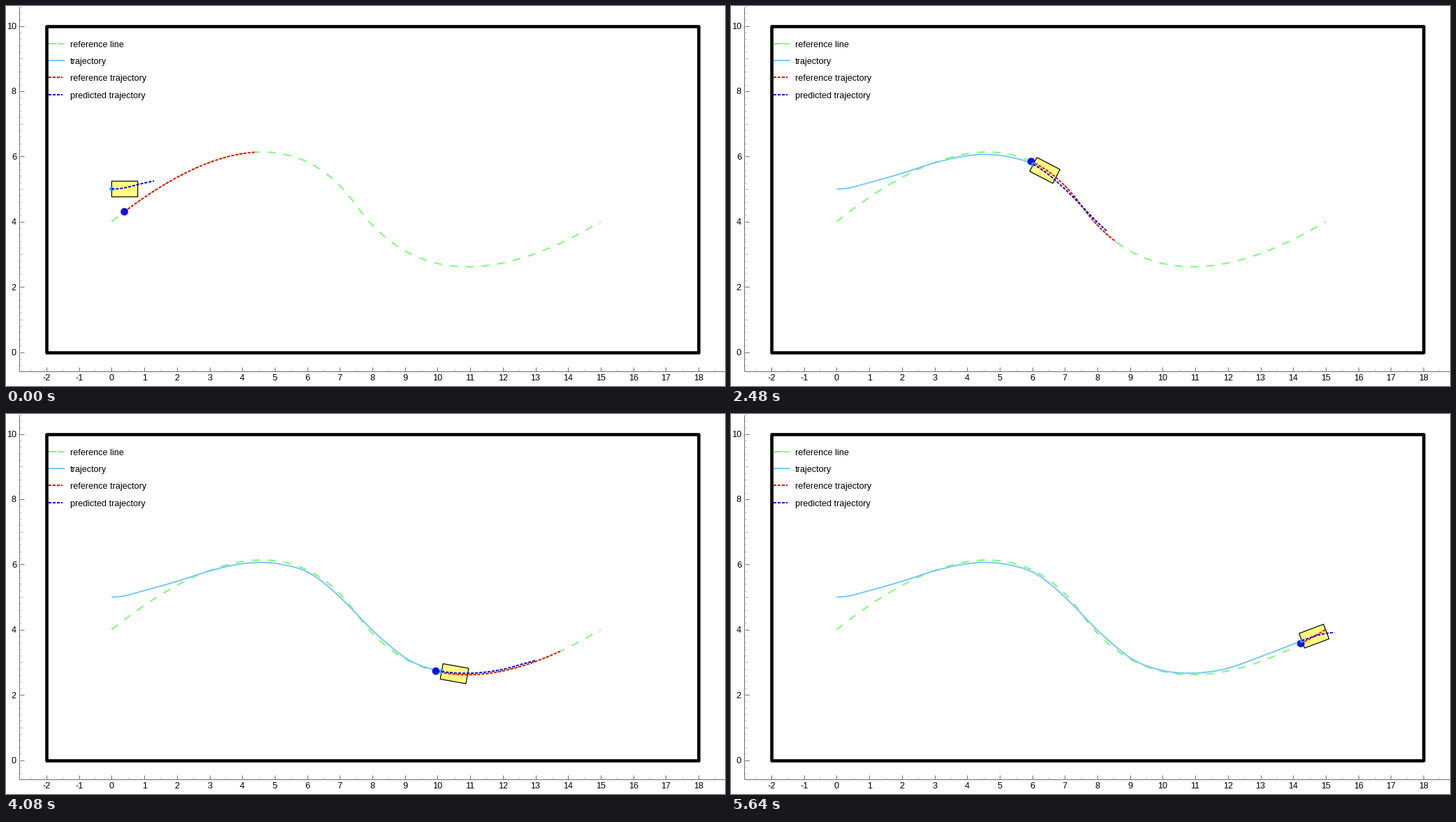
Animation, 1030 px wide and 544 px high, one loop 5680 ms. Source, as a matplotlib script:

```python
import numpy as np
import matplotlib.pyplot as plt
from matplotlib.animation import FuncAnimation
from matplotlib.patches import Circle, Polygon, Rectangle

W, H, DPI = 1030, 544, 100
PX = 72 / DPI                      # one pixel in points
FRAMES, STEP = 142, 40
UNIT, X0, Y0 = 46.7, 150.9, 495.0  # plot units to pixels

GREEN, SKY, RED, BLUE = "#78ff78", "#70c8ff", "#ff0000", "#0000ff"
AXIS, MINOR = "#6e6e6e", "#b4b4b4"
SHORT = (0, (2, 1))
CAR_L, CAR_W = 0.8, 0.48
HORIZON = 0.465


def sx(x):
    return X0 + UNIT * np.asarray(x)


def sy(y):
    return Y0 - UNIT * np.asarray(y)


def smooth(knots, start_slope=None):
    """Cubic Hermite curve through (x, y) knots."""
    kx, ky = np.array(knots, float).T
    m = np.gradient(ky, kx)
    if start_slope is not None:
        m[0] = start_slope

    def curve(x):
        x = np.asarray(x, float)
        i = np.clip(np.searchsorted(kx, x, side="right") - 1, 0, len(kx) - 2)
        h = kx[i + 1] - kx[i]
        s = (x - kx[i]) / h
        return ((1 + 2 * s) * (1 - s) ** 2 * ky[i] + s * (1 - s) ** 2 * h * m[i]
                + s * s * (3 - 2 * s) * ky[i + 1] + s * s * (s - 1) * h * m[i + 1])

    return curve


def ref(t):
    """Quadratic B-spline with control points (0,4) (5,8) (10,1) (15,4)."""
    t = np.asarray(t, float)
    a, b = t, t - 1
    x = np.where(t < 1, 10 * a - 2.5 * a * a, 7.5 + 5 * b + 2.5 * b * b)
    y = np.where(t < 1, 4 + 8 * a - 7.5 * a * a, 4.5 - 7 * b + 6.5 * b * b)
    return x, y


# driven path: y over x
path = smooth([(0, 5), (.3, 5.02), (.88, 5.165), (2, 5.48), (3, 5.80),
               (3.9, 6.005), (4.6, 6.06), (5.3, 5.985), (6.03, 5.755),
               (7, 5.0), (7.4, 4.6), (8, 3.98), (8.5, 3.53), (9, 3.14),
               (10, 2.745), (10.8, 2.665), (11.83, 2.775), (13, 3.17),
               (14.27, 3.66), (15.3, 4.04)], 0)

# car x, target parameter, prediction end x and its offset, all over seconds
car_x = smooth([(0, 0), (.68, .88), (1.2, 2.2), (1.56, 3.28), (2, 4.58),
                (2.48, 6.03), (3, 7.28), (3.52, 8.5), (4.2, 10.5),
                (4.6, 11.83), (4.8, 12.42), (5.4, 13.74), (5.64, 14.27)], 0)
target = smooth([(0, .0394), (.68, .105), (1.2, .225), (1.56, .346),
                 (1.8, .428), (2.48, .73), (3, .94), (3.52, 1.154),
                 (4.2, 1.46), (4.6, 1.635), (4.8, 1.711), (5.4, 1.864),
                 (5.64, 1.9225)], 0.03)
pred_x = smooth([(0, 1.3), (.68, 3.51), (1.56, 6.15), (2.48, 8.29),
                 (3.52, 11.44), (4.6, 14.2), (5.4, 15.1), (5.64, 15.27)])
pred_dy = smooth([(0, -.03), (.68, -.11), (1.56, 0), (2.48, 0),
                  (3.52, -.16), (4.6, -.07), (5.64, -.12)])

plt.rcParams["font.family"] = "Liberation Sans"
fig = plt.figure(figsize=(W / 100, H / 100), dpi=DPI, facecolor="white")
ax = fig.add_axes([0, 0, 1, 1])
ax.set_xlim(-.5, W - .5)
ax.set_ylim(H - .5, -.5)
ax.axis("off")


def line(xs, ys, color, width=2, z=2, style="-"):
    return ax.plot(xs, ys, color=color, lw=width * PX, ls=style, zorder=z,
                   solid_capstyle="butt", dash_capstyle="butt")[0]


def label(x, y, text, ha):
    ax.text(x, y, text, ha=ha, va="baseline", fontsize=12.65 * PX, color="black")


def draw_axes():
    line([18.5, 18.5], [0, 522], AXIS, 1)
    line([18, W], [522, 522], AXIS, 1)
    for k in range(-2, 54):
        y = sy(k * .2)
        if k % 10 == 0:
            line([19, 25], [y, y], AXIS, 1)
            label(14.5, y + 4.5, str(k // 5), "right")
        elif k % 5 == 0:
            line([19, 23], [y, y], MINOR, 1)
        else:
            line([19, 21], [y, y], MINOR, 1)
    for k in range(-5, 38):
        x = sx(k / 2)
        if k % 2:
            line([x, x], [519, 522], MINOR, 1)
        else:
            line([x, x], [516, 522], AXIS, 1)
            label(x, 536, str(k // 2), "center")


def draw_legend():
    rows = [("reference line", GREEN, (0, (5.5, 1.1))), ("trajectory", SKY, "-"),
            ("reference trajectory", RED, SHORT),
            ("predicted trajectory", BLUE, SHORT)]
    for i, (text, color, style) in enumerate(rows):
        y = 53.5 + 24.2 * i
        end = 83.5 if i < 2 else 80.5
        line([60, end], [y, y], color, 2, 6, style)
        label(91, y + 5, text, "left")


draw_axes()
draw_legend()
ax.add_patch(Rectangle((sx(-2), sy(10)), 20 * UNIT, 10 * UNIT, fill=False,
                       ec="black", lw=4.6 * PX, zorder=5, joinstyle="round"))
rx, ry = ref(np.linspace(0, 2, 400))
line(sx(rx), sy(ry), GREEN, 2, 2, (0, (5.675, 5.675)))

car = Polygon(np.zeros((4, 2)), closed=True, fc="#ffff80", ec="black",
              lw=1.2 * PX, zorder=3)
origin = Circle((0, 0), 3, color="#28a0ff", lw=0, zorder=8)
spot = Circle((0, 0), 5.4, color="#0000e6", alpha=.92, lw=0, zorder=7)
for patch in (car, origin, spot):
    ax.add_patch(patch)
trail = line([], [], SKY, 1.9, 2.5)
red = line([], [], RED, 2, 6, SHORT)
blue = line([], [], BLUE, 2, 9, SHORT)


def update(n):
    t = n * STEP / 1000
    x = float(car_x(t))
    y = float(path(x))
    xs = np.linspace(0, x, 250)
    trail.set_data(sx(xs), sy(path(xs)))

    ang = np.arctan2(float(path(x + .01)) - y, .01)
    c, s = np.cos(ang), np.sin(ang)
    box = np.array([(0, -.5), (CAR_L, -.5), (CAR_L, .5), (0, .5)]) * (1, CAR_W)
    px = x + box[:, 0] * c - box[:, 1] * s
    py = y + box[:, 0] * s + box[:, 1] * c
    car.set_xy(np.column_stack([sx(px), sy(py)]))
    origin.center = sx(x), sy(y)

    u = float(target(t))
    qx, qy = ref(np.linspace(u, min(u + HORIZON, 2), 100))
    red.set_data(sx(qx), sy(qy))
    spot.center = sx(qx[0]), sy(qy[0])

    f = np.linspace(0, 1, 80)
    fx = x + (float(pred_x(t)) - x) * f
    blue.set_data(sx(fx), sy(path(fx) + float(pred_dy(t)) * f ** 3))
    return car, origin, spot, trail, red, blue


anim = FuncAnimation(fig, update, frames=FRAMES, interval=STEP, repeat=True,
                     repeat_delay=0, init_func=lambda: update(0), blit=False)
plt.show()
```
